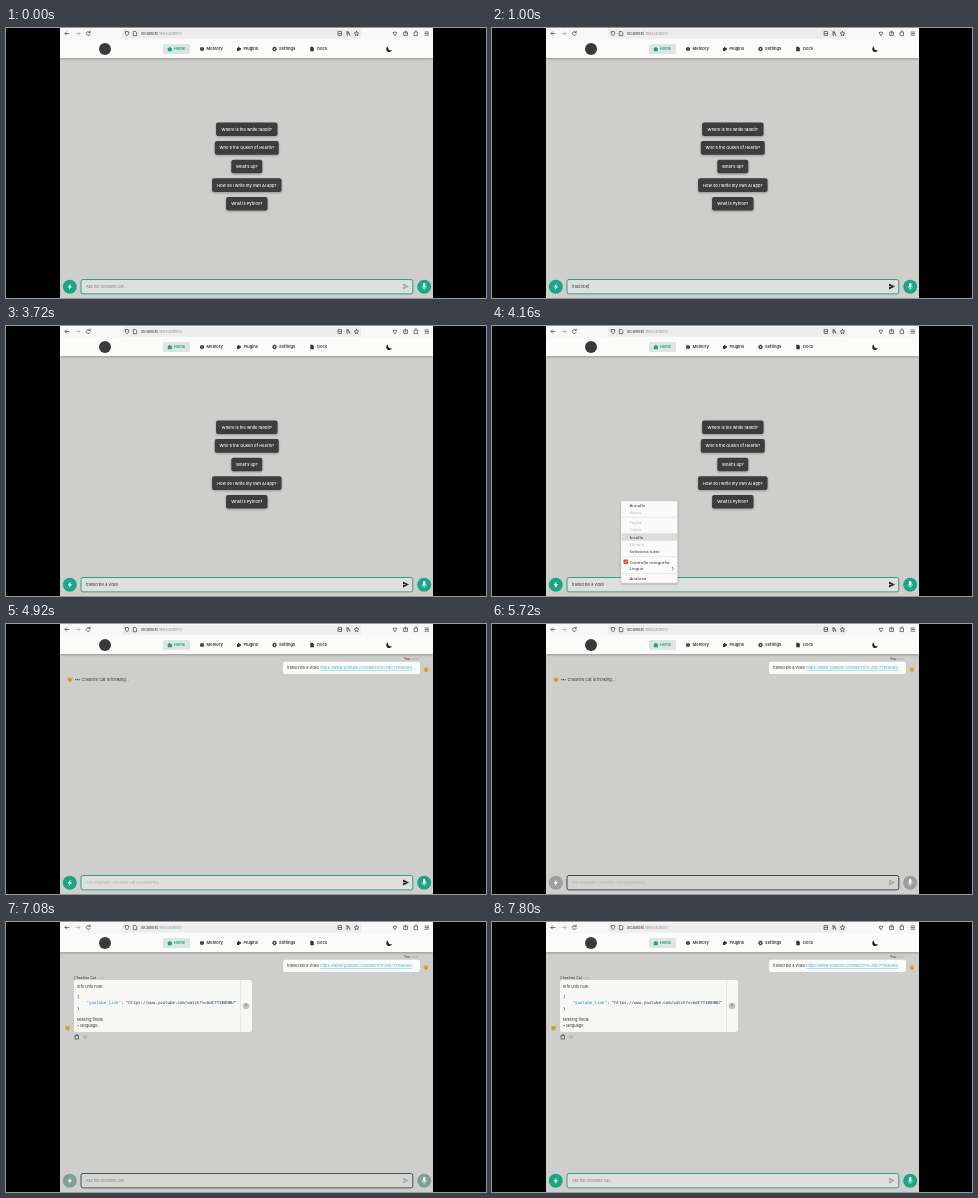
These frames come from a looping animation (480x270 px, 8 s). An HTML page:

```html
<!DOCTYPE html>
<html lang="en">
<head>
<meta charset="utf-8">
<title>Chat form demo</title>
<style>
  html, body { margin: 0; width: 100%; height: 100%; overflow: hidden; background: #000; }
  svg { display: block; width: 100vw; height: 100vh; }
  text { font: 3.95px Inter, Roboto, sans-serif; fill: #333; white-space: pre; }
  .nav text { font-size: 4.05px; font-weight: 600; }
  .tips text { font-size: 4.05px; font-weight: 500; fill: #fff; text-anchor: middle; }
  .menu text { font: 4.3px "Noto Sans", "Open Sans", sans-serif; }
  .code text { font: 4.08px "DejaVu Sans Mono", monospace; fill: #17365c; }
  .entry text { font-size: 3.8px; }
  .small { font-size: 3.6px; }
  .faint { fill: #aaa; }
  .line { fill: none; stroke: #444; stroke-width: .7; stroke-linecap: round; stroke-linejoin: round; }
</style>
</head>
<body>
<svg viewBox="0 0 480 270">
  <defs>
    <filter id="shadow" x="-20%" y="-30%" width="140%" height="180%">
      <feDropShadow dx="0" dy="1" stdDeviation="1" flood-opacity=".28"/>
    </filter>
    <g id="face">
      <circle r="2.5" fill="#e3b63d"/>
      <circle cx="-.9" cy="-.5" r=".4" fill="#54401c"/>
      <circle cx=".9" cy="-.5" r=".4" fill="#54401c"/>
      <path d="M-1 .8Q0 1.7 1 .8" fill="none" stroke="#7a4a20" stroke-width=".4"/>
    </g>
    <g id="catface">
      <path d="M-2.4-2.6L-.8-1.9H.8L2.4-2.6V.6Q2 2.5 0 2.5T-2.4 .6Z" fill="#d9b044"/>
      <circle cx="-.9" cy="-.3" r=".4" fill="#54401c"/>
      <circle cx=".9" cy="-.3" r=".4" fill="#54401c"/>
      <path d="M-.9 1Q0 1.7 .9 1" fill="none" stroke="#7a4a20" stroke-width=".4"/>
    </g>
  </defs>

  <rect width="480" height="270"/>
  <rect x="54" width="373" height="270" fill="#cececc"/>
  <rect x="54" y="11" width="373" height="19" fill="#fbfbfa" filter="url(#shadow)"/>

  <g class="browser">
    <rect x="54" width="373" height="11.5" fill="#f8f8f9"/>
    <rect x="116" y="1" width="239" height="9.5" rx="1.5" fill="#ededef"/>
    <path class="line" d="M63 5.5h-4m1.6-1.6L59 5.5l1.6 1.6M84 4.3a2 2 0 1 0 .2 2M84.2 3v1.6h-1.5"/>
    <path class="line" style="stroke:#aaa" d="M70 5.5h4m-1.6-1.6L74 5.5l-1.6 1.6"/>
    <path class="line" d="M119.2 4l1.8-.7 1.8.7q0 2.8-1.8 3.8-1.8-1-1.8-3.8zM127.7 3.5h2l1 1v3.2h-3z"/>
    <text x="135" y="7">localhost<tspan fill="#999">:1865/admin/</tspan></text>
    <path class="line" d="M332.5 3.5h3v4h-3zm0 2h3M340.3 4h2.5m-1.2 0q0 2-1.4 2.7M341.5 7.5l1.2-3 1.3 3"/>
    <path class="line" d="M350.5 3.3l.7 1.5 1.6.2-1.2 1.1.3 1.6-1.4-.8-1.4.8.3-1.6-1.2-1.1 1.6-.2z"/>
    <path class="line" d="M387.3 4.5q1.8-1 3.6 0l-1.8 3zM398 4h3.5v3.4H398zm1.7-1v3M408.5 4h3v3.6h-3zm1-1h1"/>
    <path class="line" d="M419 4h3.6m-3.6 1.6h3.6M419 7.2h3.6"/>
  </g>

  <g class="nav">
    <circle cx="99" cy="21" r="6" fill="#3a3a3a"/>
    <rect x="157" y="16" width="27" height="10" rx="1.6" fill="#dde5e2"/>
    <path d="M161.2 21l2.6-2.3 2.6 2.3h-.6v2.2h-4v-2.2z" fill="#1aa583"/>
    <text x="167.7" y="22.4" style="fill:#1aa583">Home</text>
    <circle cx="196" cy="21" r="2.1" fill="#333"/>
    <path d="M196 19.4v3.2" stroke="#ccc" stroke-width=".4"/>
    <text x="200.5" y="22.4">Memory</text>
    <path d="M231 20h1v-1h1.4v1.2a1 1 0 0 1 1.6.8 1 1 0 0 1-1.6.8V23H231z" fill="#333"/>
    <text x="237.5" y="22.4">Plugins</text>
    <circle cx="268.5" cy="21" r="1.4" fill="none" stroke="#333" stroke-width="1.1"/>
    <circle cx="268.5" cy="21" r="2.1" fill="none" stroke="#333" stroke-width=".7" stroke-dasharray=".9 .75"/>
    <text x="273" y="22.4">Settings</text>
    <path d="M304.3 18.8h2.2l1.3 1.3v3.1h-3.5z" fill="#333"/>
    <text x="311" y="22.4">Docs</text>
    <path d="M382 18.2a3 3 0 1 0 4 3.8 3 3 0 0 1-4-3.8z" fill="#222"/>
  </g>

  <g id="tips" class="tips"></g>

  <g id="chat">
    <text class="small" x="398" y="35.7">You <tspan class="faint">now</tspan></text>
    <rect x="277" y="37.8" width="137" height="12.2" rx="2.2" fill="#fbfbfa"/>
    <text x="281" y="45.2" style="font-size:3.8px">transcribe a video <tspan id="link" fill="#36b5d0" text-decoration="underline"></tspan></text>
    <use href="#face" x="420" y="45.5"/>
  </g>

  <g id="thinking">
    <use href="#catface" x="64" y="55.6"/>
    <g id="dots" fill="#444"></g>
    <text x="75.6" y="56.8">Cheshire Cat is thinking...</text>
  </g>

  <g id="reply">
    <text class="small" x="68" y="56.6">Cheshire Cat <tspan class="faint">now</tspan></text>
    <rect x="68" y="58" width="178" height="52" rx="2.2" fill="#f7f7f6"/>
    <path d="M234.5 58v52" stroke="#dededc" stroke-width=".6"/>
    <circle cx="240" cy="84" r="3.3" fill="#c4c4c3"/>
    <text x="240" y="85.4" text-anchor="middle" font-weight="600">?</text>
    <text x="71" y="66">Info until now:</text>
    <g class="code">
      <text x="71" y="76.2">{</text>
      <text x="80.5" y="82"><tspan fill="#2583b8">"youtube_link"</tspan>: <tspan id="value"></tspan></text>
      <text x="71" y="88.2">}</text>
    </g>
    <text x="71" y="99">Missing fields:</text>
    <text x="71" y="105">• language</text>
    <use href="#catface" x="61.6" y="106"/>
    <path class="line" d="M69.5 113.5h3v3.6h-3zm.8-.7h1.4"/>
    <path class="line" style="stroke:#aaa" d="M77.3 114.2v1.6h1l1.2 1v-3.6l-1.2 1zM80.7 114v2"/>
  </g>

  <g class="entry">
    <rect id="box" x="75" y="251.5" width="331.8" height="14.4" rx="2" fill="#dfdfdd"/>
    <text id="hint" x="80" y="259.5"></text>
    <text id="typed" x="80" y="259.5"></text>
    <path id="squiggle" fill="none" stroke="#e03030" stroke-width=".6"/>
    <path id="caret" stroke="#222" stroke-width=".5"/>
    <path id="send" d="M397 255.6l6 2.9-6 2.9v-2.3l3.6-.6-3.6-.6z"/>
    <circle class="knob" cx="63.8" cy="258.7" r="7"/>
    <path d="M64.6 255.5l-3 3.8h1.9l-.6 2.8 3.2-3.9h-2z" fill="#fff"/>
    <circle class="knob" cx="418.2" cy="258.7" r="7"/>
    <rect x="417" y="255" width="2.4" height="4.6" rx="1.2" fill="#fff"/>
    <path d="M416 258.3q0 2.4 2.2 2.4t2.2-2.4M418.2 260.7v1.5" fill="none" stroke="#fff" stroke-width=".5"/>
  </g>

  <g id="menu" class="menu">
    <rect x="129" y="175" width="56.5" height="82" rx="1" fill="#fafafa" stroke="#c4c4c4" stroke-width=".4" filter="url(#shadow)"/>
    <rect id="hover" x="129.5" width="55.5" height="7.4" fill="#dcdcdb"/>
    <path d="M130 191.3h54.5M130 230.7h54.5M130 247.6h54.5" stroke="#d8d8d8" stroke-width=".5"/>
    <rect x="131.5" y="233.5" width="4.6" height="4.6" rx=".8" fill="#e2522b"/>
    <path d="M132.5 235.8l1 1 1.7-2" fill="none" stroke="#fff" stroke-width=".6"/>
    <path class="line" d="M180.2 241.2l1.3 1.3-1.3 1.3"/>
  </g>
</svg>

<script>
const LOOP = 8000;
const URL_TEXT = 'https://www.youtube.com/watch?v=AdC7Y1B8HBU';
const SENT = 4920, REPLIED = 7040, FADE = 200;
const $ = id => document.getElementById(id);

function add(parent, tag, attrs, content = '') {
  const node = document.createElementNS('http://www.w3.org/2000/svg', tag);
  for (const key in attrs) node.setAttribute(key, attrs[key]);
  node.textContent = content;
  return parent.appendChild(node);
}

const tips = [
  ['Where is the white rabbit?', 61.5], ["Who's the Queen of Hearts?", 64], ["What's up?", 31],
  ['How do I write my own AI app?', 69.5], ['What is Python?', 41.5]
];
tips.forEach(([label, width], i) => {
  const y = 94.5 + i * 18.6;
  add($('tips'), 'rect', { x: 240.8 - width / 2, y, width, height: 13.6, rx: 2, fill: '#3e3e3c', filter: 'url(#shadow)' });
  add($('tips'), 'text', { x: 240.8, y: y + 8.2 }, label);
});

const items = [
  ['Annulla', 179.5], ['Ripeti', 186.5, true], ['Taglia', 196.5, true], ['Copia', 203.7, true],
  ['Incolla', 211], ['Elimina', 218.4, true], ['Seleziona tutto', 225.6],
  ['Controlla ortografia', 236], ['Lingue', 242.6], ['Analizza', 252.4]
];
for (const [label, y, off] of items)
  add($('menu'), 'text', { x: 137.6, y: y + 1.5, style: off ? 'fill:#bbb' : '' }, label);

const dots = [0, 1, 2].map(i => add($('dots'), 'circle', { cx: 69.7 + i * 1.7, r: .65 }));
$('link').textContent = URL_TEXT;
$('value').textContent = `"${URL_TEXT}"`;

const clamp = x => Math.max(0, Math.min(1, x));
const ramp = (t, start, length = FADE) => clamp((t - start) / length);
const mix = (a, b, k) => `rgb(${a.map((v, i) => Math.round(v + (b[i] - v) * k))})`;
const show = (id, on) => $(id).setAttribute('display', on ? 'inline' : 'none');

// Number of keys pressed when they fall evenly from start to end.
const keys = (t, start, end, count) =>
  t < start ? 0 : Math.min(count, 1 + Math.floor((t - start) / (end - start) * (count - 1) + 1e-6));

function entryText(t) {
  if (t >= SENT) return '';
  if (t >= 4400) return 'transcribe a video ' + URL_TEXT;
  if (t >= 3440) return 'transcribe a video';
  const count = keys(t, 120, 640, 6) + keys(t, 800, 1000, 3) + keys(t, 1280, 1760, 8);
  return 'trascribe a video'.slice(0, count);
}

function drawEntry(t) {
  const text = entryText(t);
  const typed = $('typed');
  typed.textContent = text;
  const widthOf = n => n ? typed.getSubStringLength(0, n) : 0;

  const misspelt = t >= 1280 && t < 3440;
  show('squiggle', misspelt);
  if (misspelt) {
    const steps = Math.round(widthOf(9));
    let d = 'M80 260.8';
    for (let i = 1; i <= steps; i++) d += `L${80 + i} ${i % 2 ? 260.2 : 260.9}`;
    $('squiggle').setAttribute('d', d);
  }

  let at = text.length;
  if (t >= 3160 && t < 3440) at = 3;
  else if (t >= 3440 && t < 3640) at = 4;
  show('caret', text && !(t >= 2240 && t < 2880) && !(t >= 3700 && t < 4400));
  $('caret').setAttribute('d', `M${80.4 + widthOf(at)} 256v4.4`);

  const busy = ramp(t, SENT) * (1 - ramp(t, REPLIED));
  const waiting = t >= SENT && t < REPLIED;
  show('hint', !text);
  $('hint').textContent = waiting ? 'The enigmatic Cheshire cat is pondering...' : 'Ask the Cheshire Cat...';
  $('hint').style.fill = waiting ? '#b0b0ae' : '#80807e';

  const ready = ramp(t, 120) * (1 - ramp(t, SENT));
  $('send').style.fill = mix([170, 170, 169], [35, 35, 35], ready);
  $('box').style.stroke = mix([48, 160, 134], [66, 68, 70], busy);
  $('box').style.fill = mix([223, 223, 221], [211, 211, 209], busy);
  for (const knob of document.querySelectorAll('.knob'))
    knob.style.fill = mix([26, 165, 131], [157, 157, 156], busy);
}

function drawMenu(t) {
  show('menu', t >= 3800 && t < 4340);
  // The pointer climbs from the lower corner to the paste row.
  const k = ramp(t, 3840, 260);
  const y = 257 - 46 * k * (2 - k);
  const row = items.reduce((a, b) => Math.abs(b[1] - y) < Math.abs(a[1] - y) ? b : a);
  show('hover', k > 0);
  $('hover').setAttribute('y', row[1] - 3.7);
}

function draw(t) {
  show('tips', t < SENT);
  show('chat', t >= SENT);
  show('thinking', t >= SENT && t < REPLIED);
  show('reply', t >= REPLIED);
  dots.forEach((dot, i) => {
    const wave = Math.max(0, Math.sin((t - SENT) / 1050 * 2 * Math.PI - i * .7));
    dot.setAttribute('cy', 55.7 - wave * 1.1);
  });
  drawEntry(t);
  drawMenu(t);
}

const started = performance.now();
function tick() {
  draw((performance.now() - started) % LOOP);
  requestAnimationFrame(tick);
}
tick();
</script>
</body>
</html>
```
